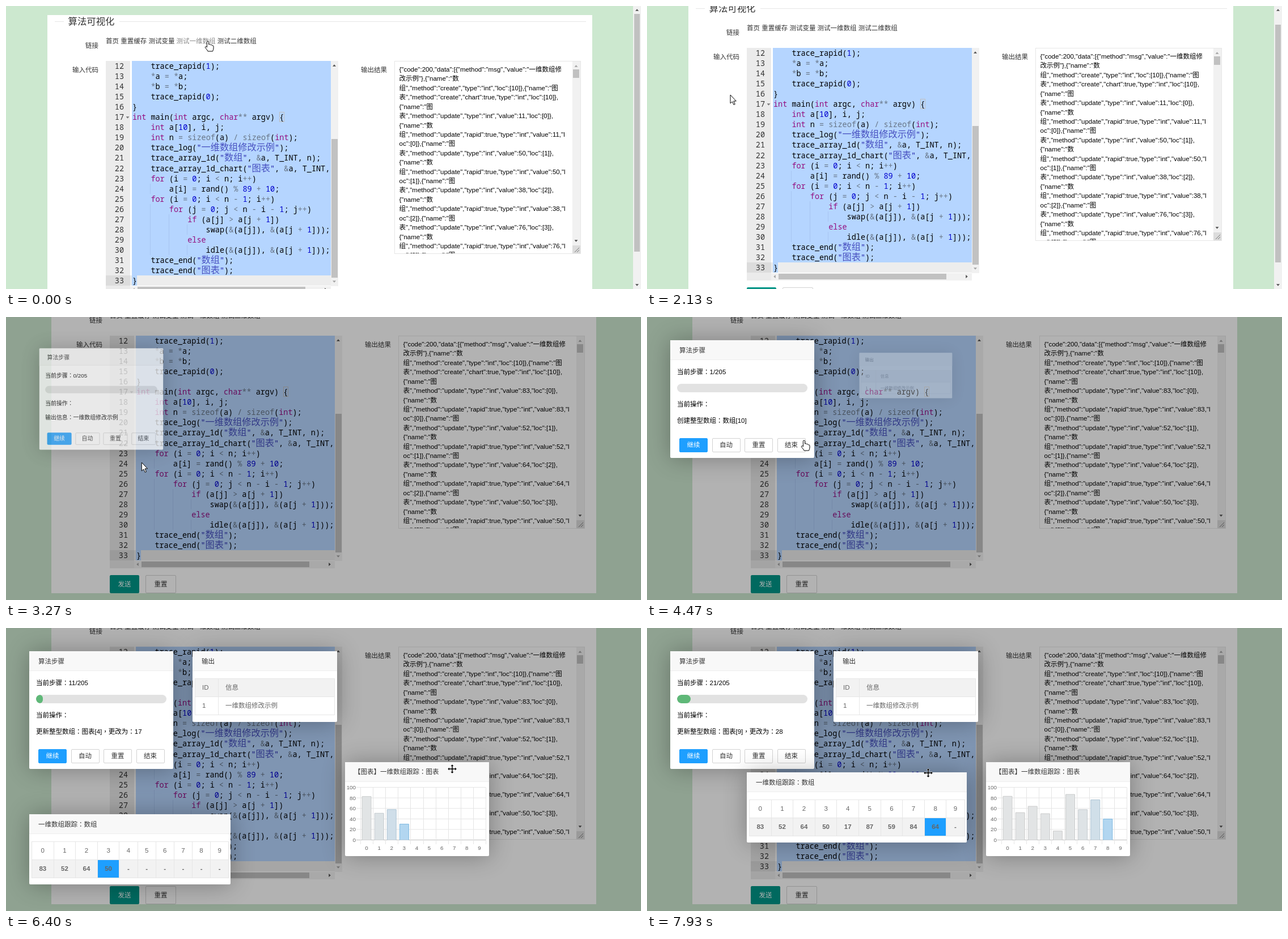
Write an HTML page that moves like this. It is 1120 by 500 pixels and loops after 8 s.

```html
<!DOCTYPE html>
<html lang="zh-CN">
<head>
<meta charset="utf-8">
<style>
html, body { margin: 0; width: 100%; height: 100%; overflow: hidden; background: #cce8cf; }
body { font: 11.5px 'Liberation Sans', 'Noto Sans CJK SC', 'Noto Sans CJK JP', sans-serif; color: #333; }
div { position: absolute; box-sizing: border-box; white-space: pre; }
#stage { width: 1120px; height: 500px; overflow: hidden; }
.code { font: 13.5px/18.05px 'Noto Sans Mono', 'Noto Sans CJK SC', monospace; color: #000; }
.code u { text-decoration: none; font-size: 16.2px; font-weight: 300; line-height: 0; opacity: .7; }
.code i { font-style: normal; box-shadow: inset -1px 0 rgba(90,110,160,.15); }
.key { color: #930f80; } .num { color: #0000cd; } .str { color: #1a1aa6; } .op { color: #687687; }
.mid { font-family: 'Noto Sans CJK TC', sans-serif; line-height: 0; }
.pop { background: #fff; border-radius: 2px; box-shadow: 1px 1px 41px rgba(0,0,0,.3); }
svg { position: absolute; left: 0; top: 0; overflow: visible; }
</style>
</head>
<body>
<div id="stage"></div>
<script>
const LOOP = 8000, LINE = 18.05;
const SCROLL = 2060, LOADING = 2750, LOADED = 3130;
const LOG_OPEN = 4425, LIST_OPEN = 4560, CHART_OPEN = 4800, FIRST = 5290, STEP = 152;
const before = [11, 50, 38, 76], values = [83, 52, 64, 50, 17, 87, 59, 84, 64, 28];

const $ = id => document.getElementById(id);
const span = (t, a, b) => Math.min(1, Math.max(0, (t - a) / (b - a)));
const smooth = p => p * p * (3 - 2 * p);
// Full-width colons and commas sit in the middle of their square
const centred = s => s.replace(/[：，]/g, '<span class="mid" lang="zh-TW">$&</span>');
const box = (x, y, w, h, css = '', html = '', attrs = '') =>
  `<div ${attrs} style="left:${x}px;top:${y}px;width:${w}px;height:${h}px;${css}">${html}</div>`;
const text = (x, y, s, css = '', attrs = '') =>
  `<div ${attrs} style="left:${x}px;top:${y - 10}px;line-height:20px;${css}">${centred(s)}</div>`;
const shapes = {
  up: '50% 0,100% 100%,0 100%', down: '0 0,100% 0,50% 100%',
  left: '0 50%,100% 0,100% 100%', right: '0 0,100% 50%,0 100%'
};
const tri = (x, y, dir, color = '#505050') => {
  const flat = dir == 'up' || dir == 'down', w = flat ? 6 : 3.5, h = flat ? 3.5 : 6;
  return box(x - w / 2, y - h / 2, w, h, `background:${color};clip-path:polygon(${shapes[dir]})`);
};
const button = (x, y, w, h, s, bg) => box(x, y, w, h,
  `border-radius:2px;text-align:center;line-height:${h - 2}px;` +
  (bg ? `background:${bg};color:#fff;border:1px solid ${bg}` : 'background:#fff;border:1px solid #d2d2d2'), s);
const cell = (x, y, w, s, css = 'text-align:center') =>
  box(x, y, w + 1, 33, `border:1px solid #e6e6e6;color:#666;line-height:31px;${css}`, s);
const popup = (id, x, y, w, h, title, body) => box(x, y, w, h, '',
  '<div style="left:0;right:0;height:35px;background:#f8f8f8;border-bottom:1px solid #eee"></div>' +
  text(16, 17.5, title) + body, `id="${id}" class="pop"`);

// Code editor
const source = `    trace_rapid(1);
    *a = *a;
    *b = *b;
    trace_rapid(0);
}
int main(int argc, char** argv) {
    int a[10], i, j;
    int n = sizeof(a) / sizeof(int);
    trace_log("一维数组修改示例");
    trace_array_1d("数组", &a, T_INT, n);
    trace_array_1d_chart("图表", &a, T_INT, n);
    for (i = 0; i < n; i++)
        a[i] = rand() % 89 + 10;
    for (i = 0; i < n - 1; i++)
        for (j = 0; j < n - i - 1; j++)
            if (a[j] > a[j + 1])
                swap(&(a[j]), &(a[j + 1]));
            else
                idle(&(a[j]), &(a[j + 1]));
    trace_end("数组");
    trace_end("图表");
}`.split('\n');
const escape = s => s.replace(/&/g, '&amp;').replace(/</g, '&lt;');
const paint = line => line.replace(/"[^"]*"|\w+|[*&=%<>+\/-]+/g, s => {
  const kind = s[0] == '"' ? 'str' : /^(int|char|for|if|else)$/.test(s) ? 'key'
    : /^\d+$/.test(s) ? 'num' : /^(sizeof|\W+)$/.test(s) ? 'op' : '';
  const body = escape(s).replace(/[\u4e00-\u9fff]+/g, '<u>$&</u>');
  return kind ? `<span class="${kind}">${body}</span>` : body;
}).replace(/^ +/, s => '<i>    </i>'.repeat(s.length / 4 - 1) + '    ');
const last = 21 * LINE;
const editor = box(176, 97, 397, 398, 'overflow:hidden;background:#fff',
  box(0, 0, 43, 398, 'background:#ebebeb') +
  box(0, last, 43, LINE, 'background:#dcdcdc') +
  box(43, last, 354, LINE, 'background:#ededed') +
  box(46, 0, 351, last, 'background:#b5d5ff') +
  box(46, last, 9, LINE, 'background:#b5d5ff') +
  box(306, 5 * LINE, 9, LINE, 'border:1px solid #c0c0c0') +
  source.map((line, i) => box(0, i * LINE, 32, LINE, 'text-align:right;color:#333', i + 12) +
    box(47, i * LINE, 600, LINE, '', paint(line))).join('') +
  tri(38.5, 100, 'down', '#777'), 'class="code"') +
  box(573, 97, 13, 398, 'background:#f1f1f1') + box(574, 235, 11, 245, 'background:#c1c1c1') +
  tri(579, 105, 'up') + tri(579, 487, 'down', '#a3a3a3') +
  box(176, 495, 397, 13, 'background:#f1f1f1') + box(176, 495, 43, 13, 'background:#ebebeb') +
  box(232, 496, 296, 10, 'background:#c1c1c1') + tri(225, 501, 'left', '#a3a3a3') + tri(564, 501, 'right');

// Response text
const response = nums => `{"code":200,"data":[{"method":"msg","value":"一维数组修
改示例"},{"name":"数
组","method":"create","type":"int","loc":[10]},{"name":"图
表","method":"create","chart":true,"type":"int","loc":[10]},
{"name":"图
` + nums.slice(0, 4).map((v, i) => `表","method":"update","type":"int","value":${v},"loc":[${i}]},
{"name":"数
组","method":"update","rapid":true,"type":"int","value":${v},"l
oc":[${i}]},{"name":"图
`).join('');
const output = box(685, 97, 329, 341, 'border:1px solid #e6e6e6;background:#fff;overflow:hidden',
  box(7.5, 6, 305, 340, 'line-height:16.42px;color:#000', '', 'id="response"') +
  box(313, 0, 14, 325, 'background:#f1f1f1') + box(314, 14, 11, 15, 'background:#c1c1c1') +
  tri(319.5, 8, 'up', '#a3a3a3') + tri(319.5, 317, 'down') +
  box(313, 325, 14, 14, 'background:#dcdcdc') +
  '<svg><path d="M317 337l8-8m-4 8l4-4" stroke="#777"/></svg>');

const page = box(0, 0, 1120, 600, '',
  box(73, 15.5, 961, 536.5, 'background:#fff') +
  box(86, 27, 16, 1, 'background:#e6e6e6') + box(200, 27, 823, 1, 'background:#e6e6e6') +
  text(109.5, 27, '算法可视化', 'font-size:16.4px') +
  text(140, 70, '链接') + text(117, 113, '输入代码') + text(626, 113, '输出结果') +
  text(176, 62, '首页 重置缓存 测试变量 <span id="link">测试一维数组</span> 测试二维数组') +
  editor + output +
  button(176, 520, 52, 32, '发送', '#009688') + button(239, 520, 54, 32, '重置'), 'id="page"');

const scrollbar = box(1106, 0, 14, 500, 'background:#f1f1f1',
  tri(7, 7, 'up') + tri(7, 493, 'down') +
  box(2, 14, 10, 420, 'background:#c1c1c1', '', 'id="thumb"'), 'id="bar"');

const loading = box(478, 228, 164, 45,
  'background:#fff;border:1px solid #4a9fd8;border-radius:2px;box-shadow:1px 1px 12px rgba(0,0,0,.25)',
  box(13.5, 7.5, 27, 27, 'border-radius:50%', '', 'id="pie"') + text(48, 21.5, '正在编译中……'), 'id="loading"');

const steps = popup('steps', 41, 41, 254, 208, '算法步骤',
  text(12, 56, '', 'color:#000', 'id="count"') +
  box(12, 77, 230, 14.5, 'background:#e2e2e2;border-radius:8px;overflow:hidden',
    box(0, 0, 0, 14.5, 'background:#5fb878;border-radius:8px', '', 'id="fill"')) +
  text(12, 113, '当前操作：', 'color:#000') + text(12, 142, '', 'color:#000', 'id="action"') +
  button(16, 173, 50, 25, '继续', '#1e9fff') +
  ['自动', '重置', '结束'].map((s, i) => button(73.5 + 57.5 * i, 173, 50, 25, s)).join(''));

const left = 'padding-left:12px';
const log = popup('log', 329, 41, 254.5, 125, '输出',
  cell(4, 48, 41, 'ID', left + ';background:#f2f2f2') + cell(45, 48, 205, '信息', left + ';background:#f2f2f2') +
  cell(4, 80, 41, '1', left) + cell(45, 80, 205, '一维数组修改示例', left));
const list = popup('list', 41, 329, 329, 124, '一维数组跟踪：数组', '<div id="cells"></div>');
const chart = popup('chart', 41, 329, 254, 166, '【图表】一维数组跟踪：图表',
  '<svg id="plot" font-size="9.8" fill="#666" width="254" height="166"></svg>');

$('stage').innerHTML = page + scrollbar + loading +
  box(0, 0, 1120, 500, 'background:rgba(0,0,0,.3)', '', 'id="shade"') +
  steps + log + list + chart +
  '<svg width="1" height="1"><path id="cursor" stroke-linejoin="round"/></svg>';

// Pointer
const cursors = {
  arrow: 'M0 0V15L3.5 12 6 17.5 8.2 16.5 5.8 11H10.3Z',
  hand: 'M-1.6 11V1.4Q-1.6 0 0 0T1.6 1.4V6Q4 5 4.8 6.6 7 6 7.6 7.8 10 7.4 10 9.4V13Q9.5 16 8.5 18H0Q-1 15.5-4.6 11.6-4.8 9.6-3.4 9.6-2.4 9.6-1.6 11Z',
  move: 'M0-8L3-5H1V-1H5V-3L8 0 5 3V1H1V5H3L0 8-3 5H-1V1H-5V3L-8 0-5-3V-1H-1V-5H-3Z'
};
const path = [[0, 356, 62], [1360, 356, 62], [2130, 147, 157], [2580, 203, 470], [2780, 203, 470],
  [3070, 230, 368], [3400, 244, 200], [3570, 244, 200], [3870, 137, 224], [4300, 137, 224],
  [4460, 277, 218], [5240, 277, 218], [5620, 230, 341], [5700, 230, 341], [6260, 787, 249],
  [6480, 787, 249], [6960, 361, 330], [7010, 361, 330], [7790, 496, 256], [LOOP, 496, 256]];
const looks = [[0, 'hand'], [1470, 'arrow'], [2520, 'hand'], [2830, 'arrow'], [3730, 'hand'],
  [5310, 'arrow'], [5570, 'move'], [6540, 'arrow'], [6920, 'move']];

function drawCursor(t) {
  const i = path.findIndex(p => p[0] > t), [t0, x0, y0] = path[i - 1], [t1, x1, y1] = path[i];
  const p = smooth(span(t, t0, t1)), look = looks.filter(l => l[0] <= t).pop()[1], solid = look == 'move';
  const c = $('cursor');
  c.setAttribute('d', cursors[look]);
  c.setAttribute('fill', solid ? '#000' : '#fff');
  c.setAttribute('stroke', solid ? '#fff' : '#000');
  c.setAttribute('stroke-width', solid ? .5 : 1);
  c.setAttribute('transform', `translate(${x0 + (x1 - x0) * p} ${y0 + (y1 - y0) * p})`);
}

function place(id, t, start, x, y) {
  const p = 1 - (1 - span(t, start, start + 300)) ** 2, s = $(id).style;
  s.display = t < start ? 'none' : 'block';
  s.opacity = p;
  s.transform = p < 1 ? `scale(${.5 + p / 2})` : 'none';
  if (x !== undefined) { s.left = x + 'px'; s.top = y + 'px'; }
}

function drawList(done) {
  let x = 4, html = '';
  for (let i = 0; i < 10; i++) {
    const w = i < done ? 38.6 : 32.15, bg = i == done - 1 ? '#1e9fff' : '#f2f2f2';
    html += cell(x, 48, w, i) +
      cell(x, 80, w, i < done ? values[i] : '-', `text-align:center;font-weight:bold;background:${bg}`);
    x += w;
  }
  $('cells').innerHTML = html;
  $('list').style.width = x + 4 + 'px';
}

const mix = (a, b, p) => `rgb(${a.map((v, i) => v + (b[i] - v) * p)})`;
function drawChart(t) {
  const filled = t >= FIRST, x0 = filled ? 27 : 34, w = (248 - x0) / 10, top = 44.5, base = 137.5;
  const labels = filled ? [100, 80, 60, 40, 20, 0] : ['1.0', '0.5', '0', '-0.5', '-1.0'];
  const line = (d, color = '#e5e5e5') => `<path d="${d}" stroke="${color}"/>`;
  let svg = '';
  labels.forEach((s, i) => {
    const y = top + (base - top) * i / (labels.length - 1);
    svg += line(`M${x0 - 7} ${y}H248`, s == 0 ? '#bfbfbf' : undefined) +
      `<text x="${x0 - 8}" y="${y + 3.5}" text-anchor="end">${s}</text>`;
  });
  for (let i = 0; i <= 10; i++) svg += line(`M${Math.round(x0 + w * i) + .5} ${top}V145`);
  values.forEach((v, i) => {
    const x = x0 + w * (i + .5), age = t - FIRST - 2 * STEP * i;
    svg += `<text x="${x}" y="155" text-anchor="middle">${i}</text>`;
    if (age < 0) return;
    const h = v * .93 * (1 - Math.exp(-age / 215)), fade = 1 - Math.exp(-Math.max(0, age - 2 * STEP) / 215);
    svg += `<path d="M${x - w * .36} ${base}v${-h}h${w * .72}v${h}" fill="${mix([178, 214, 240], [226, 228, 229], fade)}" stroke="${mix([125, 184, 224], [204, 204, 204], fade)}"/>`;
  });
  $('plot').innerHTML = svg;
}

function action(k) {
  if (k == 0) return '输出信息：一维数组修改示例';
  if (k < 3) return `创建整型数组：${k == 1 ? '数组' : '图表'}[10]`;
  const i = (k - 3) >> 1;
  return `更新整型数组：${k % 2 ? '图表' : '数组'}[${i}]，更改为：${values[i]}`;
}

let shown;
function frame() {
  const t = performance.now() % LOOP, loaded = t >= LOADED;
  const scroll = 64 * smooth(span(t, SCROLL, SCROLL + 174));
  $('page').style.transform = `translate(${loaded ? 7 : 0}px,${-Math.round(scroll)}px)`;
  $('thumb').style.top = 14 + scroll * .83 + 'px';
  $('bar').style.display = loaded ? 'none' : 'block';
  $('shade').style.display = loaded ? 'block' : 'none';
  $('link').style.color = t < 1470 ? '#888' : '';
  if (shown !== loaded) $('response').textContent = response((shown = loaded) ? values : before);

  place('loading', t, LOADING);
  if (loaded) $('loading').style.display = 'none';
  $('pie').style.background = `conic-gradient(#4a86d8 ${(t - LOADING + 400) / 400 % 1}turn,#87b0e6 0)`;

  const k = t >= FIRST ? 4 + Math.floor((t - FIRST) / STEP)
    : [LOG_OPEN, LIST_OPEN, CHART_OPEN].filter(s => s <= t).length;
  $('count').innerHTML = centred(`当前步骤：${k}/205`);
  $('action').innerHTML = centred(action(k));
  $('fill').style.width = (k > 1 ? 230 * k / 205 : 0) + 'px';

  const chartDrag = smooth(span(t, 5700, 6260)), listDrag = smooth(span(t, 7010, 7790));
  place('steps', t, LOADED);
  place('log', t, LOG_OPEN);
  place('list', t, LIST_OPEN, 41 + 135 * listDrag, 329 - 74 * listDrag);
  place('chart', t, CHART_OPEN, 41 + 557 * chartDrag, 329 - 92.5 * chartDrag);
  drawList(Math.max(0, (k - 3) >> 1));
  drawChart(t);
  drawCursor(t);
  requestAnimationFrame(frame);
}
frame();
</script>
</body>
</html>
```
